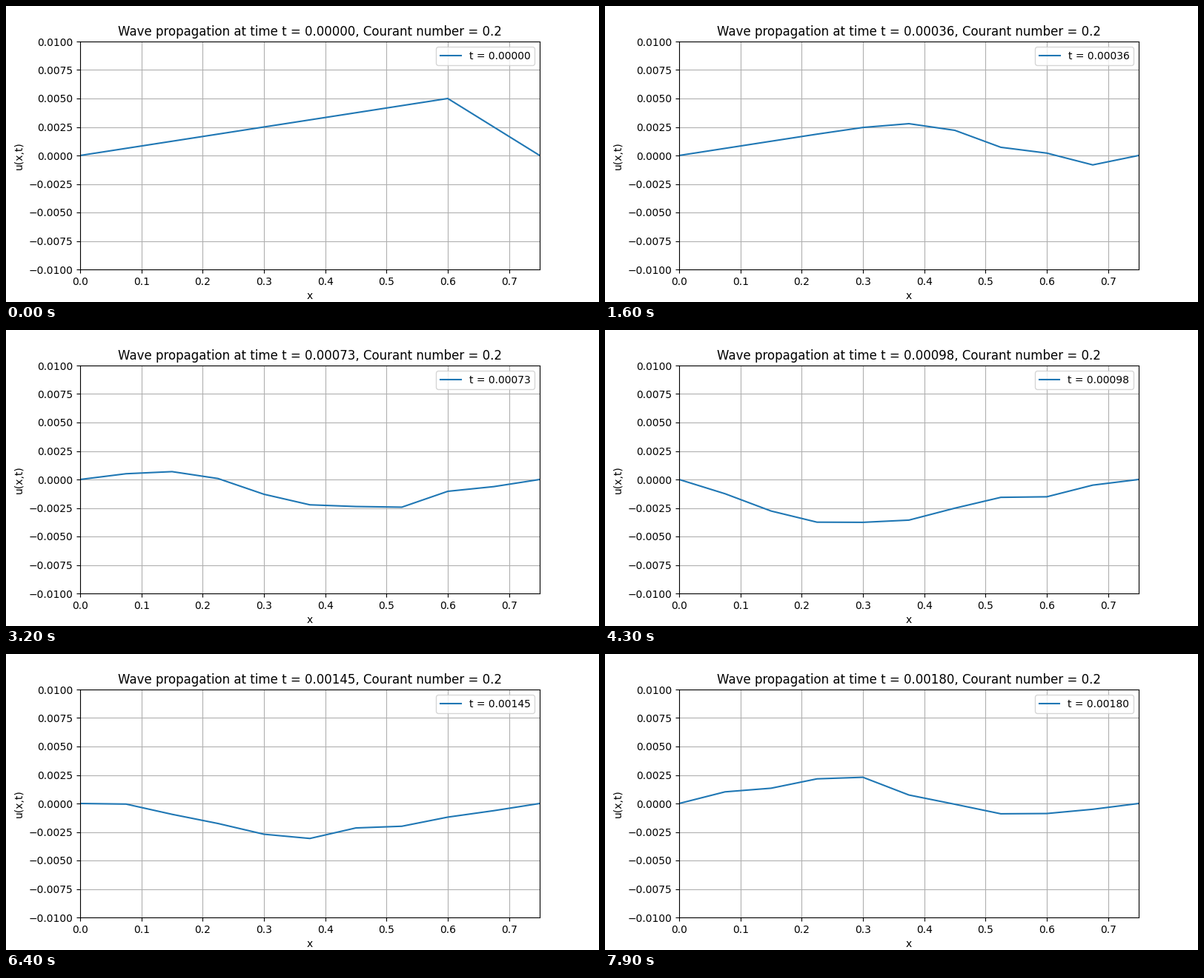
A matplotlib script for the animation above (8 s loop, 800 by 400 pixels).

```python
import matplotlib.pyplot as plt
import numpy as np
from matplotlib.animation import FuncAnimation

plt.rcParams["font.family"] = "DejaVu Sans"

LENGTH = 0.75        # string length
PLUCK = 0.6          # where the string is pulled
HEIGHT = 0.005       # how far it is pulled
SPEED = 660.0        # wave speed
COURANT = 0.2
CELLS = 10
STEPS = 80

x = np.linspace(0, LENGTH, CELLS + 1)
dt = COURANT * (LENGTH / CELLS) / SPEED


def curvature(u):
    """Second difference, zero at the fixed ends."""
    d = np.zeros_like(u)
    d[1:-1] = u[2:] - 2 * u[1:-1] + u[:-2]
    return d


def solve():
    """Explicit leapfrog solution of the wave equation, starting at rest."""
    u = np.zeros((STEPS, CELLS + 1))
    u[0] = np.interp(x, [0, PLUCK, LENGTH], [0, HEIGHT, 0])
    u[1] = u[0] + 0.5 * COURANT**2 * curvature(u[0])
    for n in range(1, STEPS - 1):
        u[n + 1] = 2 * u[n] - u[n - 1] + COURANT**2 * curvature(u[n])
    return u


waves = solve()

fig, ax = plt.subplots(figsize=(8, 4), dpi=100)
line, = ax.plot(x, waves[0], label="t = 0.00000")
ax.set_xlim(0, LENGTH)
ax.set_ylim(-0.01, 0.01)
ax.set_xlabel("x")
ax.set_ylabel("u(x,t)")
ax.grid(True)
title = ax.set_title("")
label = ax.legend(loc="upper right").get_texts()[0]


def update(n):
    clock = f"t = {n * dt:.5f}"
    line.set_ydata(waves[n])
    label.set_text(clock)
    title.set_text(f"Wave propagation at time {clock}, Courant number = {COURANT}")
    return line, label, title


anim = FuncAnimation(fig, update, frames=STEPS, interval=100, repeat=True)
plt.show()
```
